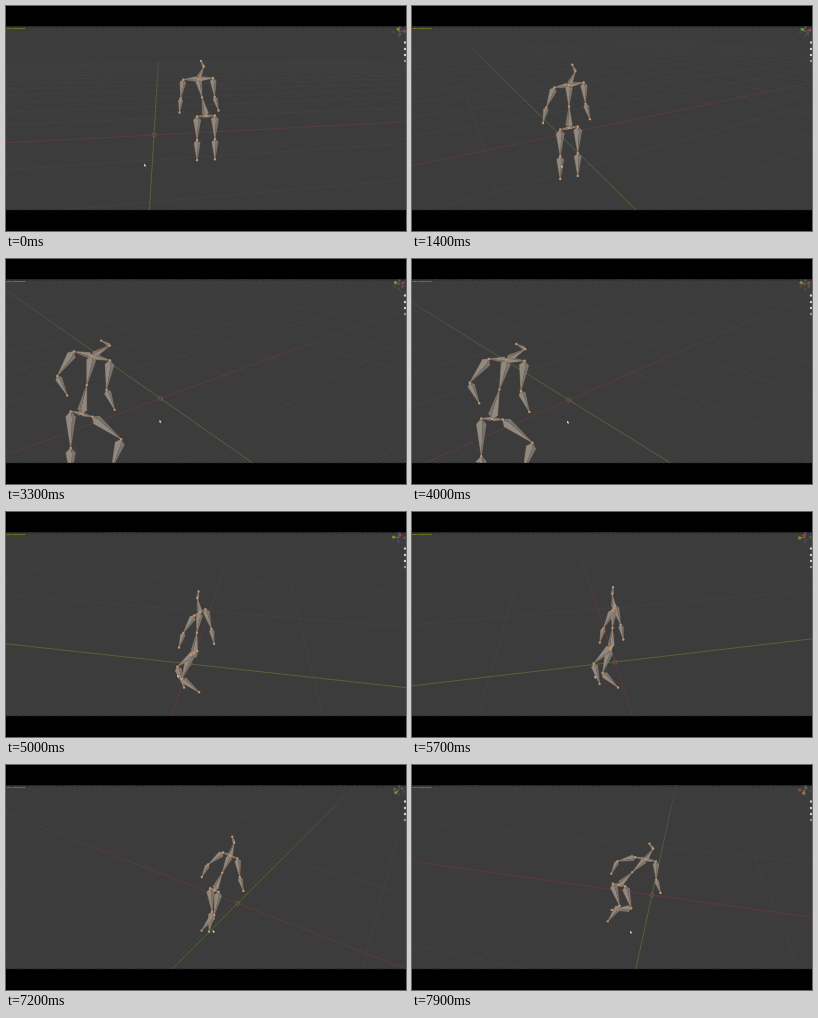
These frames come from a looping animation (400x225 px, 8 s). An HTML page:

```html
<!DOCTYPE html>
<html lang="en">
<head>
<meta charset="utf-8">
<title>Armature orbit</title>
<style>
  html, body { margin: 0; width: 100%; height: 100%; overflow: hidden; background: #000; }
  svg { display: block; width: 100vw; height: 100vh; }
  text { font: 600 2.4px "Open Sans", Inter, sans-serif; fill: #b4be0c; }
</style>
</head>
<body>
<svg viewBox="0 0 400 225">
  <defs>
    <clipPath id="view"><rect y="20.5" width="400" height="183.5"/></clipPath>
    <linearGradient id="haze" x1="0" y1="0" x2="0" y2="1">
      <stop offset="0" stop-color="#3c3c3c" stop-opacity=".8"/>
      <stop offset=".45" stop-color="#3c3c3c" stop-opacity="0"/>
    </linearGradient>
  </defs>
  <rect width="400" height="225" fill="#000"/>
  <g clip-path="url(#view)" fill="none">
    <rect y="20" width="400" height="185" fill="#3c3c3c"/>
    <path id="grid" stroke="#454545" stroke-width=".6"/>
    <path id="axisX" stroke="#623b40" stroke-width=".8"/>
    <path id="axisY" stroke="#5f6b3a" stroke-width=".8"/>
    <rect y="20" width="400" height="185" fill="url(#haze)"/>
    <circle id="origin" r="2.1" stroke="#865650" stroke-width=".6"/>
    <path id="light" fill="#8f8982"/>
    <path id="dark" fill="#75706b"/>
    <path id="outline" stroke="#a5876d" stroke-width=".45" stroke-linejoin="round"/>
    <path id="joints" stroke="#c3946c" stroke-width="2.4" stroke-linecap="round"/>
    <g id="gizmo" stroke-width=".8"></g>
    <g fill="#d0d0d0">
      <circle cx="399" cy="36.5" r="1.2"/><circle cx="399" cy="43" r="1.2"/>
      <circle cx="399" cy="49" r="1.2"/><circle cx="399" cy="55" r="1.2" opacity=".6"/>
    </g>
    <path id="pointer" d="M0 0V3.2L.8 2.5 1.4 3.7 2 3.4 1.4 2.3H2.4Z" fill="#fff" stroke="#222" stroke-width=".25"/>
  </g>
  <path d="M0 21H400M0 204H400" stroke="#242424" stroke-width=".8" stroke-dasharray="3 2"/>
  <text x="0" y="22.9">User Perspective</text>
</svg>
<script>
const LOOP = 8000, STEP = 100;
const CENTER_X = 200, CENTER_Y = 113, FOCAL = 278, TILE = 0.6, REACH = 14, NEAR = 0.4;
const $ = id => document.getElementById(id);
const set = (id, path) => $(id).setAttribute("d", path);
const moveTo = (id, p) => $(id).setAttribute("transform", `translate(${pt(p)})`);
const rad = degrees => degrees * Math.PI / 180;
const pt = p => p.map(n => n.toFixed(2)).join(" ");
const poly = points => "M" + points.map(pt).join("L") + "Z";
const middle = (p, q) => [(p[0] + q[0]) / 2, (p[1] + q[1]) / 2];

// Straight motion between a few [seconds, value] points.
const track = (...points) => s => {
  const last = points.length - 1;
  if (s <= points[0][0]) return points[0][1];
  if (s >= points[last][0]) return points[last][1];
  const i = points.findIndex(p => p[0] > s), [s0, a] = points[i - 1], [s1, b] = points[i];
  return a + (b - a) * (s - s0) / (s1 - s0);
};

const camera = {
  yaw: track([0, 9], [1.4, 30], [4, 44], [5, 80], [7.9, 166]),
  horizon: track([0, 30], [1.4, 12], [4, -16], [5, -45], [7.9, -60]),
  x: track([0, 148], [1.4, 148], [4, 157], [6.4, 222], [7.9, 240]),
  y: track([1.4, 129], [2.6, 138], [4, 141], [5, 152], [6.4, 148], [7.9, 130]),
};
const body = {
  x: track([0, 200], [1.4, 157], [2.6, 71], [4, 80], [5, 188], [6.4, 210], [7.9, 207]),
  y: track([0, 110], [1.4, 122], [2.6, 150], [4, 160], [5, 141], [7.9, 120]),
  size: track([0, 38], [1.4, 43], [2.6, 57], [4, 61], [5, 41], [7.9, 37]),
  lean: track([0, -12], [1.4, 0], [4, 14], [6.4, 0], [7.9, 46]),
  // which way the knees point: 1 right, -1 left
  facing: track([1.4, 0], [2.6, 1], [4, 1], [5, -1], [6.4, -0.8], [7.9, 0.3]),
};
const pointerX = track([0, 138], [1.4, 149], [4, 155], [7.9, 218]);

const BONES = ["neck skull", "skull crown", "neck shL", "neck shR", "shL elL", "elL haL",
  "shR elR", "elR haR", "neck waist", "pelvis waist", "pelvis hipL", "pelvis hipR",
  "hipL knL", "knL ftL", "hipR knR", "knR ftR"].map(pair => pair.split(" "));

function drawFloor(s) {
  const ox = camera.x(s), oy = camera.y(s), horizon = camera.horizon(s);
  const yaw = rad(camera.yaw(s)), cos = Math.cos(yaw), sin = Math.sin(yaw);
  const reach = Math.hypot(FOCAL, CENTER_Y - horizon);
  const side0 = (ox - CENTER_X) / (oy - horizon), depth0 = reach / (oy - horizon);
  const ground = (u, v) => [side0 + TILE * (u * cos - v * sin), depth0 + TILE * (u * sin + v * cos)];
  const project = ([side, depth]) => [CENTER_X + side * reach / depth, horizon + reach / depth];

  const segment = (a, b) => {
    if (a[1] > b[1]) [a, b] = [b, a];
    if (b[1] <= NEAR) return "";
    if (a[1] < NEAR) {
      const t = (NEAR - a[1]) / (b[1] - a[1]);
      a = [a[0] + (b[0] - a[0]) * t, NEAR];
    }
    return "M" + pt(project(a)) + "L" + pt(project(b));
  };
  const lineX = k => segment(ground(-REACH, k), ground(REACH, k));
  const lineY = k => segment(ground(k, -REACH), ground(k, REACH));

  let grid = "";
  for (let k = -REACH; k <= REACH; k++) if (k) grid += lineX(k) + lineY(k);
  set("grid", grid);
  set("axisX", lineX(0));
  set("axisY", lineY(0));
  moveTo("origin", [ox, oy]);
}

function pose(s) {
  const size = body.size(s), lean = body.lean(s), facing = body.facing(s);
  const kick = Math.max(0, s - 6.4) / 1.5, crouch = Math.max(0, -facing), reach = Math.max(0, facing);
  // Angles run from straight down, positive to the right.
  const hang = ([x, y], degrees, length) =>
    [x + Math.sin(rad(degrees)) * length * size, y + Math.cos(rad(degrees)) * length * size];
  const rise = (p, degrees, length) => hang(p, 180 - degrees, length);

  const width = 0.42 * size * Math.abs(Math.cos(rad(camera.yaw(s) * 0.7 + 15)));
  const sway = -0.08 * size * Math.cos(2 * Math.PI * (s - 0.9) / 4.3);
  const beside = ([x, y], k) => [x + width * k, y + sway * k];

  const j = { pelvis: [body.x(s), body.y(s)] };
  j.neck = rise(j.pelvis, lean, 1);
  j.waist = middle(j.pelvis, j.neck);
  const nod = 25 + 35 * facing;
  j.skull = rise(j.neck, nod, 0.35);
  j.crown = rise(j.skull, -nod, 0.17);

  const limb = (root, [mid, end], [upper, lower], [upperLength, lowerLength]) => {
    j[mid] = hang(root, upper, upperLength);
    j[end] = hang(j[mid], lower, lowerLength);
  };
  j.shL = beside(j.neck, -1);
  j.shR = beside(j.neck, 1);
  j.hipL = beside(j.pelvis, -0.6);
  j.hipR = beside(j.pelvis, 0.6);
  const arm = [0.5, 0.37], leg = [0.62, 0.53];
  limb(j.shL, ["elL", "haL"], [-22 - 1.2 * lean, -12 + 45 * reach - 0.6 * lean], arm);
  limb(j.shR, ["elR", "haR"], [5 - 12 * facing, 16 + 6 * facing], arm);
  limb(j.hipL, ["knL", "ftL"], [17 * kick - 20 * crouch, 52 * crouch - 37 * kick], leg);
  limb(j.hipR, ["knR", "ftR"], [52 * facing, -18 * facing - 80 * kick], leg);
  return j;
}

function drawBody(s) {
  const j = pose(s);
  let light = "", dark = "", outline = "";
  for (const [from, to] of BONES) {
    const a = j[from], b = j[to], dx = b[0] - a[0], dy = b[1] - a[1];
    const length = Math.hypot(dx, dy) || 1;
    const half = Math.min(4.8, Math.max(1.2, length * 0.15));
    const nx = -dy / length * half, ny = dx / length * half;
    const at = (along, side) => [a[0] + dx * along + nx * side, a[1] + dy * along + ny * side];
    const left = at(0.15, 1), right = at(0.15, -1), ridge = at(0.19, -0.3);
    light += poly([a, left, b, ridge]);
    dark += poly([a, ridge, b, right]);
    outline += poly([a, left, b, right]) + "M" + [left, ridge, right].map(pt).join("L");
  }
  set("light", light);
  set("dark", dark);
  set("outline", outline);
  set("joints", Object.values(j).map(p => "M" + pt(p) + "h.01").join(""));
}

function drawGizmo(s) {
  const yaw = rad(camera.yaw(s)), cos = Math.cos(yaw), sin = Math.sin(yaw);
  const cx = 393, cy = 25.5, size = 5.5, tilt = 0.45;
  const arm = (x, y, color) => {
    const dx = x * size, dy = y * size;
    return `<circle cx="${cx - dx}" cy="${cy - dy}" r="1.4" fill="${color}" opacity=".4"/>
      <path d="M${cx} ${cy}l${dx} ${dy}" stroke="${color}"/>
      <circle cx="${cx + dx}" cy="${cy + dy}" r="1.6" fill="${color}"/>`;
  };
  $("gizmo").innerHTML = arm(0, -0.8, "#4a5a8c") + arm(cos, -sin * tilt, "#96404a") + arm(-sin, -cos * tilt, "#6f9a22");
}

function draw(s) {
  drawFloor(s);
  drawBody(s);
  drawGizmo(s);
  moveTo("pointer", [pointerX(s), 157.5 + s]);
}

const start = performance.now();
function tick() {
  const time = (performance.now() - start) % LOOP;
  draw(Math.floor(time / STEP) * STEP / 1000);
  requestAnimationFrame(tick);
}
tick();
</script>
</body>
</html>
```
